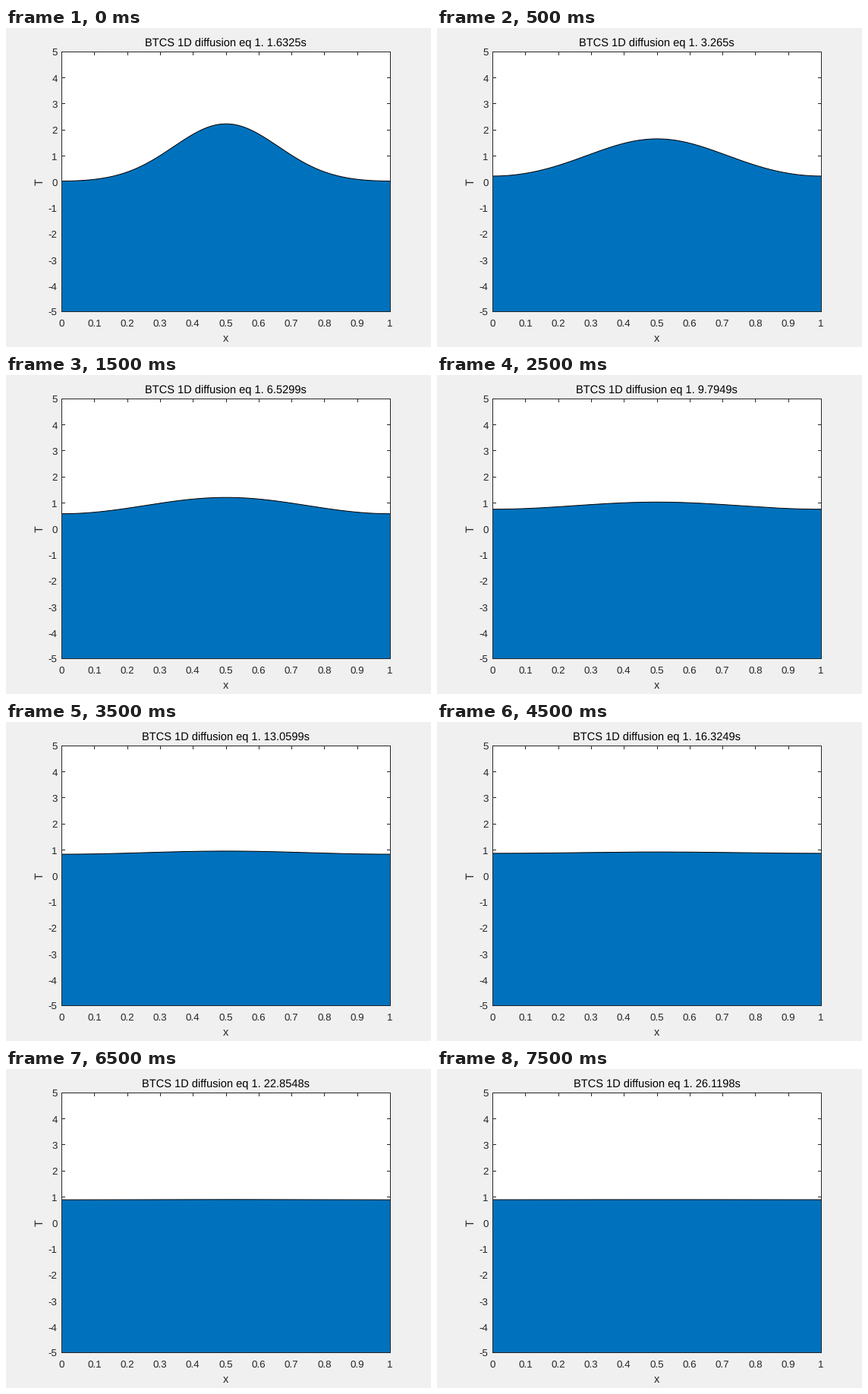
Animation of 560x420 px, one loop 8000 ms. Source, as a matplotlib script:

```python
import numpy as np
import matplotlib.pyplot as plt
from matplotlib.animation import FuncAnimation
from matplotlib.patches import Polygon, Rectangle

W, H, DPI = 560, 420, 80
FRAMES, INTERVAL = 16, 500
STEP = 1.632486             # simulated seconds per frame

PX = 72 / DPI               # one pixel in points
LEFT, RIGHT, TOP, BOTTOM = 73.5, 506.5, 31.5, 373.5
ZERO_Y, UNIT = 202.65, 34.23
TICK = 4.5
INK, BLUE = "#262626", "#0072bd"

# Diffusing bump as a cosine series between insulated ends
MEAN, FIRST, DECAY = 0.8952, 0.604, 0.662

plt.rcParams["font.family"] = "Liberation Sans"
plt.rcParams["text.hinting"] = "none"

fig = plt.figure(figsize=(W / DPI, H / DPI), dpi=DPI, facecolor="#f0f0f0")
ax = fig.add_axes([0, 0, 1, 1])
ax.set_xlim(0, W)
ax.set_ylim(H, 0)
ax.axis("off")

x = np.linspace(0, 1, 201)
x_px = LEFT + (RIGHT - LEFT) * x


def profile(i):
    q = FIRST * DECAY ** i
    waves = sum(q ** (k * k) * np.cos(2 * np.pi * k * (x - 0.5))
                for k in range(1, 7))
    return MEAN * (1 + 2 * waves)


def label(px, py, text, size, color=INK, ha="center", rotation=0):
    return ax.text(px, py, text, fontsize=size * PX, color=color, ha=ha,
                   va="baseline", rotation=rotation,
                   rotation_mode="anchor", zorder=5)


def stroke(xs, ys, z, color=INK):
    # Coordinates already sit on pixel centres, so snapping stays off
    return ax.plot(xs, ys, color=color, lw=PX, zorder=z, snap=False,
                   solid_capstyle="butt", solid_joinstyle="miter")[0]


def pixel_centre(v):
    return np.floor(v) + 0.5


ax.add_patch(Rectangle((LEFT, TOP), RIGHT - LEFT, BOTTOM - TOP,
                       fc="white", ec="none", snap=False, zorder=0))

# Ticks lie beneath the filled area
for n in range(11):
    tx = LEFT + (RIGHT - LEFT) * n / 10
    mark = pixel_centre(tx)
    stroke([mark, mark], [TOP, TOP + TICK], 1)
    stroke([mark, mark], [BOTTOM, BOTTOM - TICK], 1)
    label(tx - 0.5, 393, f"{n / 10:g}", 13.33)

    value = n - 5
    ty = ZERO_Y - UNIT * value
    mark = pixel_centre(ty)
    stroke([LEFT, LEFT + TICK], [mark, mark], 1)
    stroke([RIGHT, RIGHT - TICK], [mark, mark], 1)
    label(67.7, ty + 5.2, str(value), 13.33, ha="right")

area = ax.add_patch(Polygon([[0, 0], [1, 0], [1, 1]], fc=BLUE, ec="none",
                            snap=False, zorder=2))
curve = stroke([], [], 3, "black")
stroke([LEFT, LEFT, RIGHT, RIGHT, LEFT, LEFT],
       [BOTTOM, TOP, TOP, BOTTOM, BOTTOM, TOP], 4)

label(289.5, 413, "x", 14.67)
label(48.5, 202.5, "T", 14.67, rotation=90)
title = label(289.5, 24, "", 14.67, "black")


def draw(i):
    y_px = ZERO_Y - UNIT * profile(i)
    curve.set_data(x_px, y_px)
    top = np.column_stack([x_px, y_px])
    area.set_xy(np.vstack([top, [[RIGHT, BOTTOM], [LEFT, BOTTOM]]]))
    seconds = f"{STEP * (i + 1):.4f}".rstrip("0").rstrip(".")
    title.set_text(f"BTCS 1D diffusion eq 1. {seconds}s")
    return area, curve, title


anim = FuncAnimation(fig, draw, frames=FRAMES, interval=INTERVAL,
                     repeat=True, repeat_delay=0, blit=False)
plt.show()
```
